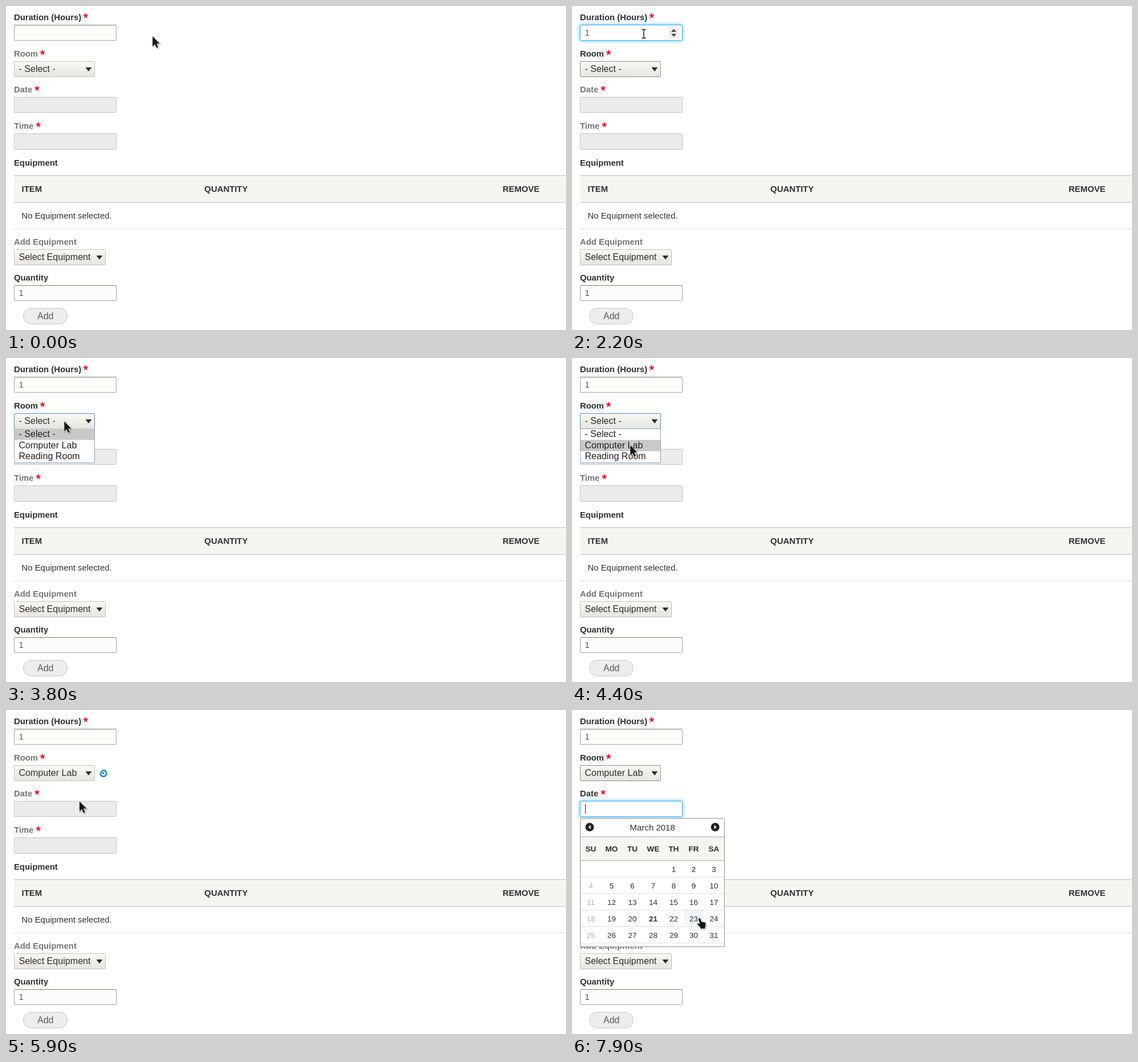
These frames come from a looping animation (983x570 px, 8000 ms). An HTML page:

```html
<!DOCTYPE html>
<html lang="en">
<head>
<meta charset="utf-8">
<title>Booking form</title>
<style>
html, body { margin: 0; width: 100%; height: 100%; overflow: hidden; background: #fff; }
svg { display: block; width: 983px; height: 570px; font: 14.9px "Liberation Sans", Arial, sans-serif; }
text { white-space: pre; }
.b { font-weight: bold; }
.glow { filter: drop-shadow(0 0 3px #40b6ff); }
</style>
</head>
<body>
<svg id="stage" viewBox="0 0 983 570"></svg>
<script>
const stage = document.getElementById('stage');
const DARK = '#303030', DIM = '#757575', LOOP = 8000, TICK = 100;
const CELL_X = [15, 51, 88, 124, 161, 196, 231, 267];

// Pointer hotspot: time, x, y
const TRACK = [
  [200, 257, 53], [600, 126, 49], [2200, 126, 49], [2500, 202, 62], [3000, 124, 104],
  [3100, 107, 121], [3300, 102, 111], [4000, 102, 111], [4400, 102, 153], [5500, 102, 153],
  [6100, 142, 164], [6300, 133, 177], [6900, 133, 177], [7600, 226, 367], [7700, 228, 366],
  [7800, 228, 366], [7900, 224, 366]
];

const clamp = v => Math.max(0, Math.min(1, v));
const during = (t, a, b) => t >= a && t < b;
const inside = (p, x, y, w, h) => p.x >= x && p.x < x + w && p.y >= y && p.y < y + h;

const text = (x, y, s, fill = DARK, more = '') => `<text x="${x}" y="${y}" fill="${fill}" ${more}>${s}</text>`;
const bold = (x, y, s, fill, more = '') => text(x, y, s, fill, 'class="b" ' + more);
const big = (x, y, s, fill) => text(x, y, s, fill, 'font-size="16.1"');
const mid = size => `text-anchor="middle" font-size="${size}"`;
const rect = (x, y, w, h, fill, more = '') => `<rect x="${x}" y="${y}" width="${w}" height="${h}" fill="${fill}" ${more}/>`;
const frame = (x, y, w, h, fill, stroke, r = 1.5, more = '') =>
  rect(x + .5, y + .5, w - 1, h - 1, fill, `stroke="${stroke}" rx="${r}" ${more}`);
const path = (d, fill, more = '') => `<path d="${d}" fill="${fill}" ${more}/>`;
const group = (x, y, s) => `<g transform="translate(${x} ${y})">${s}</g>`;

function star(x, y) {
  let d = '';
  for (let i = 0; i < 5; i++) {
    const a = (i * 72 - 90) * Math.PI / 180;
    d += `M0 0L${(4.3 * Math.cos(a)).toFixed(2)} ${(4.3 * Math.sin(a)).toFixed(2)}`;
  }
  return group(x, y, path(d, 'none', 'stroke="#e8141b" stroke-width="1.9"'));
}

function input(y, on, glow = 0, h = 28) {
  if (!on) return frame(14, y, 180, h, '#ebebeb', '#c6c6c6');
  return frame(14, y, 180, h, '#fcfcfa', '#a3a3a3') + rect(15, y, 178, 1, '#8a8a8a') +
    rect(15, y + 1, 178, 1, '#e6e6e4') +
    (glow ? frame(14, y, 180, h, '#fff', '#40b6ff', 2, `class="glow" opacity="${glow}"`) : '');
}

function select(y, w, label, on, focus) {
  const edge = focus ? '#4a90c8' : on ? '#8c8c8c' : '#c2c2be';
  return frame(14, y, w, 28, 'url(#face)', edge) + big(22.4, y + 19.4, label) +
    path(`M${w - 2.5} ${y + 11}h11l-5.5 7z`, '#2b2b2b');
}

const caret = (x, y) => rect(x, y, 1, 17, '#222');

function spinner() {
  return rect(170, 38, 17, 18, '#ededed', 'rx="2"') + path('M174 45.5l4.6-5 4.6 5zM174 49l4.6 5 4.6-5z', '#444');
}

function table() {
  return rect(14, 298, 969, 48, '#f5f5f2') + rect(14, 298, 969, 1, '#bdbdb6') + rect(14, 345, 969, 1, '#bdbdb6') +
    bold(27.5, 327.3, 'ITEM') + bold(348.3, 327.3, 'QUANTITY') + bold(871.8, 327.3, 'REMOVE') +
    text(27.5, 374, 'No Equipment selected.') + rect(14, 391.5, 969, 1, '#d9d9d6');
}

function options(hot) {
  return frame(14, 124, 142, 61, '#fff', '#7fa5c4', 0) + rect(15, 124 + hot * 20, 140, 20, '#c9c9c9') +
    ['- Select -', 'Computer Lab', 'Reading Room'].map((s, i) => big(22.4, 139.2 + i * 19.6, s, '#222')).join('');
}

function throbber(t) {
  const arc = path('M4.8 -2.4A5.4 5.4 0 1 0 4.8 2.4M-1 0H6.2', 'none', 'stroke="#2583cf" stroke-width="2.7"');
  return group(171, 111.5, `<g transform="rotate(${(t - 5300) * .36})">${arc}</g>`);
}

const dayAt = p => {
  if (p.y < 265 || p.y >= 410) return 0;
  const col = CELL_X.findIndex((x, i) => i < 7 && p.x >= x && p.x < CELL_X[i + 1]);
  const day = Math.floor((p.y - 265) / 29) * 7 + col - 3;
  return col > 0 && day > 0 ? day : 0;
};

function calendar(alpha, hot) {
  let s = frame(14, 190, 254, 227, '#fff', '#929292', 1) + rect(15, 223, 252, 42, '#f5f5f2') +
    rect(15, 222.5, 252, 1, '#a6a6a0') + rect(15, 264.5, 252, 1, '#a6a6a0') +
    text(141.2, 211.6, 'March 2018', DARK, mid(15));
  for (const [x, k] of [[31, -1], [251.3, 1]])
    s += `<circle cx="${x}" cy="206" r="7.5" fill="#222"/>` + path(`M${x - 1.6 * k} 202.3v7.4l${4 * k} -3.7z`, '#fff');
  const centre = c => (CELL_X[c] + CELL_X[c + 1]) / 2;
  ['SU', 'MO', 'TU', 'WE', 'TH', 'FR', 'SA'].forEach((d, c) => s += bold(centre(c), 248.8, d, DARK, mid(13.7)));
  for (let d = 1; d < 32; d++) {
    const c = (d + 3) % 7, r = Math.floor((d + 3) / 7);
    if (d === hot) s += rect(CELL_X[c], 265 + r * 29, CELL_X[c + 1] - CELL_X[c], 29, '#f0f7fd');
    s += (d === 21 ? bold : text)(centre(c), 284.8 + r * 29, d, c ? DARK : '#b5b5b5', mid(13.6));
  }
  for (let r = 1; r < 6; r++) s += rect(15, 264.5 + r * 29, 252, 1, '#dedede');
  return `<g opacity="${alpha}">${s}</g>`;
}

function tooltip() {
  return rect(135, 65, 166, 31, '#2b2b2b', 'rx="3"') + text(218, 85, 'Please fill out this field.', '#fff', mid(13));
}

function pointerAt(t) {
  const i = TRACK.findIndex(k => k[0] > t);
  if (i === 0) return { x: TRACK[0][1], y: TRACK[0][2] };
  const b = TRACK[i < 0 ? TRACK.length - 1 : i], a = i < 0 ? b : TRACK[i - 1];
  const k = b === a ? 0 : (t - a[0]) / (b[0] - a[0]);
  return { x: a[1] + (b[1] - a[1]) * k, y: a[2] + (b[2] - a[2]) * k };
}

const WHITE_EDGE = 'stroke="#fff" stroke-width="1.6" stroke-linejoin="round" paint-order="stroke"';
const SHADE = 'style="filter:drop-shadow(1px 1px 1px rgba(0,0,0,.35))"';
const CURSORS = {
  arrow: path('M.3 .3V18.2L4.4 14.4L7.2 20.8L10.1 19.5L7.3 13.2H12.8Z', '#161616', WHITE_EDGE + SHADE),
  beam: path('M-3.6 -7.5H-1L0 -6.7L1 -7.5H3.6M0 -7V7M-3.6 7.5H-1L0 6.7L1 7.5H3.6', 'none', 'stroke="#fff" stroke-width="3"') +
    path('M-3.6 -7.5H-1L0 -6.7L1 -7.5H3.6M0 -7V7M-3.6 7.5H-1L0 6.7L1 7.5H3.6', 'none', 'stroke="#161616" stroke-width="1.4"'),
  hand: path('M-1.6 .8Q-.2 -.6 1.2 1L3 6.4L8.6 7.6Q10.8 8.3 10.7 10.6L10.1 14.4L9 18.4H1.8L1 16L-3.6 11.4Q-4.2 9.2 -2.2 9.3L.4 10.8L-1.8 2.6Z',
    '#161616', WHITE_EDGE + SHADE)
};

function pointer(t, p, open, day) {
  let kind = 'arrow';
  if (inside(p, 14, 33, 180, 28) || (t > 6100 && inside(p, 14, 160, 180, 28))) kind = 'beam';
  else if ((t >= 1700 && !open && inside(p, 14, 97, 142, 28)) || day) kind = 'hand';
  return group(p.x, p.y, CURSORS[kind]);
}

function draw(t) {
  const p = pointerAt(t);
  const open = during(t, 3500, 5300), busy = during(t, 5300, 6100);
  const roomOn = t >= 1700 && !during(t, 5400, 6100), dateOn = t >= 6100;
  const hoursGlow = t < 3400 ? clamp((t - 1050) / 200) : clamp((3550 - t) / 200);
  const dateGlow = t < 6500 ? 0 : clamp((t - 6450) / 200);
  const day = t >= 6500 ? dayAt(p) : 0;
  const blinkOn = from => (t - from) % 1200 < 600;

  let s = '<defs><linearGradient id="face" x2="0" y2="1"><stop stop-color="#f8f8f5"/><stop offset="1" stop-color="#e6e6de"/></linearGradient></defs>';
  s += bold(13.9, 25.2, 'Duration (Hours)') + star(140, 17.2) + input(33, true, hoursGlow);
  if (during(t, 400, 3500)) s += spinner();
  if (t >= 1600) s += text(22.4, 52.2, '1', '#595959');
  if (during(t, 1100, 3400) && blinkOn(t < 1600 ? 1100 : 1600)) s += caret(t < 1600 ? 23 : 30, 38.5);

  s += bold(13.9, 89.4, 'Room', roomOn ? DARK : DIM) + star(64.3, 82) +
    select(97, 142, t < 5300 ? '- Select -' : 'Computer Lab', roomOn, open);
  if (busy) s += throbber(t);

  s += bold(13.9, 152, 'Date', dateOn ? DARK : DIM) + star(54.6, 145) + input(160, dateOn, dateGlow);
  if (t >= 6500 && blinkOn(6500)) s += caret(23, 165.5);
  s += bold(13.9, 216.2, 'Time', DIM) + star(56.8, 209) + input(224, false, 0, 29);

  s += bold(13.9, 280.6, 'Equipment') + table();
  s += bold(13.9, 420.4, 'Add Equipment', DIM) + select(428, 161, 'Select Equipment', false);
  s += bold(13.9, 483.2, 'Quantity') + input(491, true) + text(22.4, 510.2, '1', '#595959');
  s += frame(30, 531, 78, 29, '#ededed', '#c8c8c8', 14) + text(69.2, 550.8, 'Add', '#5c5c5c', mid(16));

  if (open) s += options(p.y < 144 ? 0 : 1);
  if (t >= 6500) {
    const fade = .5 - Math.cos(Math.PI * clamp((t - 6300) / 400)) / 2;
    s += calendar(fade, day || (p.y < 265 ? 21 : 0));
  }
  if (during(t, 900, 1100)) s += tooltip();
  stage.innerHTML = s + pointer(t, p, open, day);
}

let shown = -1;
const start = performance.now();
function loop(now) {
  const t = Math.floor((Math.max(0, now - start) % LOOP) / TICK) * TICK;
  if (t !== shown) draw(shown = t);
  requestAnimationFrame(loop);
}
draw(0);
requestAnimationFrame(loop);
</script>
</body>
</html>
```
